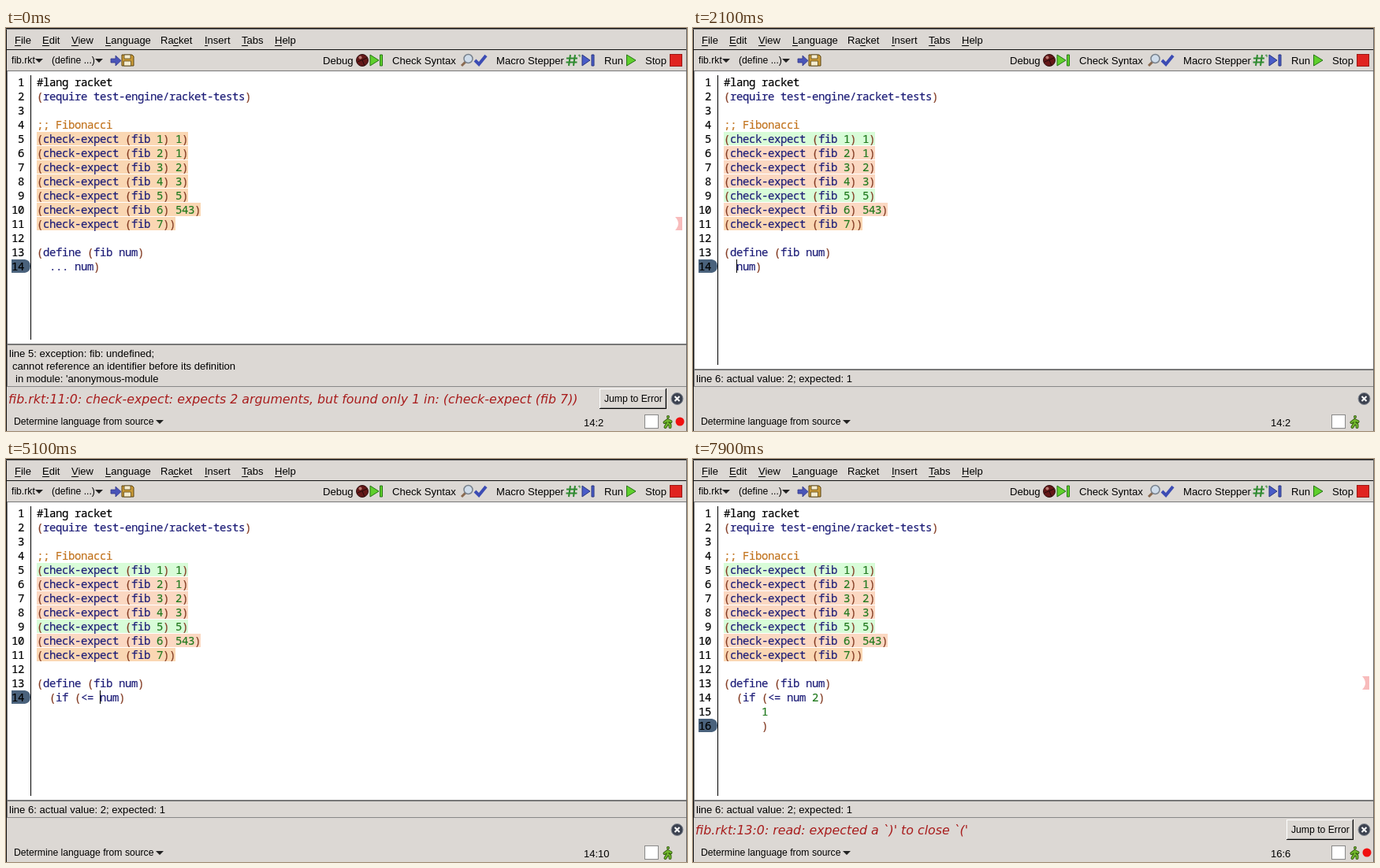
Recreate the animation shown at these times as an HTML page. Size 864x512 px, loop 8000 ms.

```html
<!DOCTYPE html>
<html lang="en">
<head>
<meta charset="utf-8">
<title>Editor with live tests</title>
<style>
html, body { margin: 0; width: 100%; height: 100%; overflow: hidden; background: #dcd8d4; }
svg { display: block; width: 864px; height: 512px; }
text { white-space: pre; font: 13.1px "Liberation Sans", Arial, sans-serif; fill: #000; }
.menu text { font-size: 13px; }
.small { font-size: 12.2px; }
.code text {
  font: 14px "Noto Sans Mono", "DejaVu Sans Mono", monospace;
  letter-spacing: -.4px;
  fill: var(--ink, #000);
  stroke: var(--ink, #000);
  stroke-width: .2px;
}
.code .paren { --ink: #843c24; }
.code .name { --ink: #1e1e78; }
.code .num { --ink: #217a1e; }
.code .note { --ink: #c2741f; }
#error text.msg { font: italic 15.8px "DejaVu Sans", Verdana, sans-serif; fill: #a81c1c; }
</style>
</head>
<body>
<svg viewBox="0 0 864 512">
  <rect width="864" height="512" fill="#dcd8d4"/>
  <path d="M0 .5H864M.5 0V512M0 27.5H864" stroke="#111"/>
  <path d="M0 1.500H864" stroke="#777"/>
  <path d="M863.5 0V512" stroke="#666"/>
  <g class="menu" id="menu"></g>

  <!-- toolbar -->
  <text class="small" x="7" y="45">fib.rkt</text>
  <text class="small" x="58" y="45">(define ...)</text>
  <path d="M37 39h10l-5 5zM113 39h10l-5 5zM190 498h10l-5 5z" fill="#222"/>
  <path d="M133 39h6v-4l7 6.500-7 6.500v-4h-6z" fill="#4a55b8" stroke="#30378a" stroke-width=".8"/>
  <g stroke="#5a4512">
    <path d="M147 34h13l2 2v12h-15z" fill="#c99a38"/>
    <path d="M150 34h8v5h-8zM149.500 42h9v6h-9z" fill="#f4ecd0" stroke-width=".8"/>
  </g>
  <text x="402" y="46">Debug</text>
  <circle cx="452" cy="41" r="7.5" fill="#641818" stroke="#301010"/>
  <circle cx="449.500" cy="37.500" r="2" fill="#b87870"/>
  <path d="M446 43l12-5M452 41l3 7" stroke="#260a0a"/>
  <g fill="#5fd02c" stroke="#267516">
    <path d="M462 34l11 7-11 7zM474.500 34h3v14h-3z"/>
    <path d="M787.500 34l11.500 7-11.500 7z"/>
  </g>
  <text x="490" y="46">Check Syntax</text>
  <path d="M583 43l-5 5" stroke="#8a6a50" stroke-width="3"/>
  <circle cx="586.500" cy="39" r="5.500" fill="#cfdcea" stroke="#78818c" stroke-width="1.500"/>
  <path d="M595 41l5 5 9-11" fill="none" stroke="#3c4cb4" stroke-width="4"/>
  <text x="622" y="46">Macro Stepper</text>
  <path d="M716 34l-2 14M722 34l-2 14M711 38.500h14M710.500 43.500h14" stroke="#2f8a30" stroke-width="2"/>
  <path d="M726 35l2-1v3" fill="none" stroke="#2f8a30"/>
  <path d="M731 34l10 7-10 7zM743 34h3v14h-3z" fill="#4a5cc8" stroke="#29357e"/>
  <text x="759" y="46">Run</text>
  <text x="811" y="46">Stop</text>
  <rect x="842.500" y="33.500" width="15" height="15" fill="#e02420" stroke="#9c1814"/>

  <!-- editor and test report -->
  <rect x="2" y="55" width="861" height="400" fill="#fff"/>
  <path d="M1 54.500H863M1.500 54V456" stroke="#777"/>
  <g class="code" id="code"></g>
  <g id="report"></g>
  <path d="M1 455.500H863" stroke="#888"/>

  <!-- status area -->
  <circle cx="851.500" cy="471" r="7.500" fill="#3c4250" stroke="#8a8f98"/>
  <path d="M848.500 468l6 6m0-6l-6 6" stroke="#fff" stroke-width="2"/>
  <text class="small" x="10" y="504">Determine language from source</text>
  <text id="pos" x="733" y="506" style="font-size:13px"></text>
  <rect x="810.500" y="491.500" width="17" height="17" fill="#fff" stroke="#888"/>
  <g fill="none" stroke="#365f12" stroke-width="4" stroke-linecap="round" stroke-linejoin="round">
    <path id="runner" d="M840 494v.01M839.500 498v4l-3 5M839.500 502l3 2v3M835.500 501l4-3 4 2"/>
    <use href="#runner" stroke="#72b92c" stroke-width="2"/>
  </g>
  <g id="error"></g>
</svg>
<script>
const LOOP = 8000, PITCH = 18, LEFT = 39, CHAR = 8;
const DEL = 'del', ENTER = '\n      ';

const head = ['#lang racket', '(require test-engine/racket-tests)', '', ';; Fibonacci',
  ...['1) 1)', '2) 1)', '3) 2)', '4) 3)', '5) 5)', '6) 543)', '7))'].map(s => '(check-expect (fib ' + s),
  '', '(define (fib num)'];

const keys = [
  [800, DEL], [1100, DEL], [1350, DEL], [1600, DEL],
  [2700, '('], [2900, 'i'], [3100, 'f'], [3300, ' '], [3500, '('],
  [4600, '<'], [4800, '='], [5000, ' '], [5150, 'n'], [5300, 'u'], [5400, 'm'], [5600, ' '], [5800, '2'],
  [6100, ')'], [6300, ENTER], [6600, '1'], [6800, ENTER],
  [7000, DEL], [7150, DEL], [7300, DEL]
];

const unclosed = "read: expected a `)' to close `('";
const errors = [
  { from: 0, to: 800, line: 11, msg: 'fib.rkt:11:0: check-expect: expects 2 arguments, but found only 1 in: (check-expect (fib 7))' },
  { from: 4000, to: 4600, line: 14, msg: 'fib.rkt:14:2: ' + unclosed },
  { from: 7800, to: LOOP, line: 13, msg: 'fib.rkt:13:0: ' + unclosed }
];
const TESTED = 2000;

const $ = id => document.getElementById(id);
const esc = s => s.replace(/&/g, '&amp;').replace(/</g, '&lt;');
const text = (x, y, s, cls = '') => `<text x="${x}" y="${y}" class="${cls}">${esc(s)}</text>`;
const rect = (x, y, w, h, fill) => `<rect x="${x}" y="${y}" width="${w}" height="${h}" fill="${fill}"/>`;
const rowTop = n => 60 + (n - 1) * PITCH;

function put(id, html) {
  const el = $(id);
  if (el.shown !== html) el.innerHTML = el.shown = html;
}

function tokens(line, y) {
  if (line[0] === '#') return text(LEFT, y, line);
  if (line[0] === ';') return text(LEFT, y, line, 'note');
  return [...line.matchAll(/[()]|[^\s()]+/g)].map(({ 0: s, index }) => {
    const cls = /[()]/.test(s) ? 'paren' : /^\d+$/.test(s) ? 'num' : 'name';
    return text(LEFT + CHAR * index, y, s, cls);
  }).join('');
}

function testColor(n, tested) {
  if (!tested || n === 11) return '#fad7b3';
  return n === 5 || n === 9 ? '#d8fcd8' : '#fbd8c2';
}

function stateAt(t) {
  let before = '  ', after = '... num)', last = -600;
  for (const [at, key] of keys) {
    if (at > t) break;
    if (key === DEL) after = after.slice(1);
    else before += key;
    last = at;
  }
  const rows = before.split('\n');
  return {
    lines: [...head, ...(before + after).split('\n')],
    row: head.length + rows.length,
    col: rows[rows.length - 1].length,
    caret: (t - last) % 1000 < 550,
    tested: t >= TESTED,
    error: errors.find(e => t >= e.from && t < e.to)
  };
}

function drawCode({ lines, row, col, caret, tested, error }) {
  const top = rowTop(row);
  let out = `<path d="M31.500 60V${tested ? 428 : 396}" stroke="#000"/>`;
  out += `<path d="M7 ${top}h17q7 1 7 8.500t-7 8.500h-17z" fill="#4a627c"/>`;
  lines.forEach((line, i) => {
    const n = i + 1, y = rowTop(n) + 14;
    if (n > 4 && n < 12) out += rect(LEFT, rowTop(n), line.length * CHAR, 17, testColor(n, tested));
    out += text(n < 10 ? 15 : 7, y, String(n)) + tokens(line, y);
  });
  if (caret) out += rect(LEFT + col * CHAR, top, 1, 17, '#000');
  if (error) out += `<path d="M849 ${rowTop(error.line)}h9v17h-9q8-8.500 0-17z" fill="#f8bcbc"/>`;
  put('code', out);
}

function drawReport(tested) {
  const y = tested ? 433 : 401;
  let out = rect(2, y, 861, 455 - y, '#dcd8d4') + rect(1, y, 862, 2, '#777');
  out += tested ? text(4, 450, 'line 6: actual value: 2; expected: 1')
    : text(4, 418, 'line 5: exception: fib: undefined;')
      + text(8, 434, 'cannot reference an identifier before its definition')
      + text(12, 450, "in module: 'anonymous-module");
  put('report', out);
}

function drawError(error) {
  put('error', !error ? '' : text(3, 477, error.msg, 'msg')
    + rect(753, 458, 85, 26, '#000') + rect(753, 458, 84, 25, '#fff')
    + rect(754, 459, 83, 24, '#999') + rect(754, 459, 82, 23, '#dcd8d4')
    + text(759, 475, 'Jump to Error', 'small')
    + '<circle cx="855" cy="500" r="5.500" fill="#f01010"/>');
}

function drawMenu() {
  const items = [[11, 'File', 8], [46, 'Edit', 9], [83, 'View', 9], [126, 'Language', 7],
    [196, 'Racket', 7, 16], [252, 'Insert', 4], [299, 'Tabs', 8], [341, 'Help', 9]];
  put('menu', items.map(([x, s, w, skip = 0]) =>
    text(x, 20, s) + rect(x + skip, 22, w, 1, '#000')).join(''));
}

const start = performance.now();
function frame() {
  const s = stateAt((performance.now() - start) % LOOP);
  drawCode(s);
  drawReport(s.tested);
  drawError(s.error);
  put('pos', `${s.row}:${s.col}`);
  requestAnimationFrame(frame);
}
drawMenu();
frame();
</script>
</body>
</html>
```
